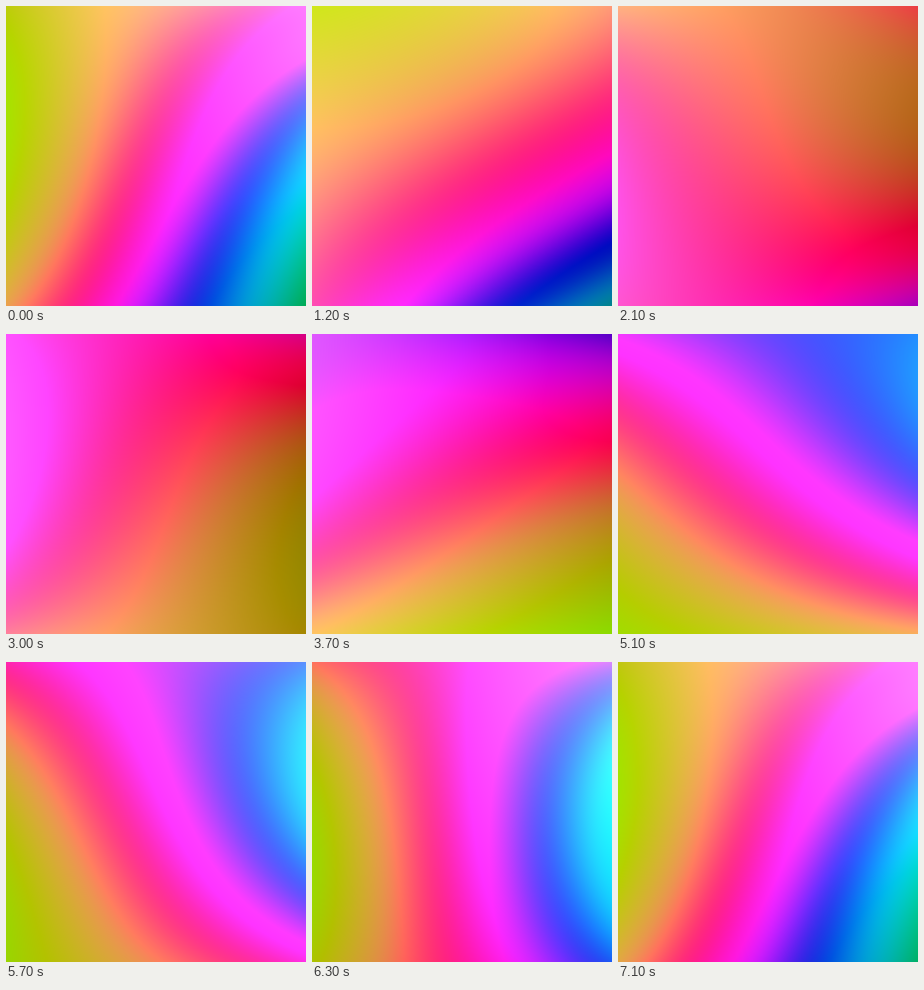
An HTML page with a canvas for the animation above (7.2 s loop, 300 by 300 pixels).

```html
<!DOCTYPE html>
<html lang="en">
<head>
<meta charset="utf-8">
<title>Flowing colour</title>
<style>
html, body { margin: 0; width: 100%; height: 100%; overflow: hidden; }
canvas { display: block; width: 100vw; height: 100vh; }
</style>
</head>
<body>
<canvas id="stage" width="300" height="300"></canvas>
<script>
const SIZE = 300, LOOP = 7200, STEP = 100;
const ctx = document.getElementById('stage').getContext('2d');
const image = ctx.createImageData(SIZE, SIZE);

// Lime, tan, pink, magenta, blue, cyan, green; values past 0..255 clip into flat bands.
const stops = [
  [175, 212, -10], [232, 155, 75], [300, 45, 140], [245, 45, 265],
  [60, 75, 255], [10, 205, 245], [0, 225, 120]
];
const SPACING = 2, FINE = 100, LOW = -2, HIGH = 13;
const ENTRIES = (HIGH - LOW) * FINE;

// Stops continue in a straight line beyond both ends.
function stopAt(i, c) {
  const inner = Math.max(0, Math.min(stops.length - 2, i));
  return stops[inner][c] + (i - inner) * (stops[inner + 1][c] - stops[inner][c]);
}

function catmullRom(a, b, c, d, s) {
  return b + s / 2 * (c - a + s * (2 * a - 5 * b + 4 * c - d + s * (3 * (b - c) + d - a)));
}

const palette = new Float32Array((ENTRIES + 1) * 3);
for (let n = 0; n <= ENTRIES; n++) {
  const place = (LOW + n / FINE) / SPACING, i = Math.floor(place);
  for (let c = 0; c < 3; c++) {
    const near = [-1, 0, 1, 2].map(k => stopAt(i + k, c));
    palette[n * 3 + c] = catmullRom(...near, place - i);
  }
}

function draw(t) {
  // One swing per loop, highest when the loop reaches the given angle.
  const wave = (mean, swing, peak) =>
    mean + swing * Math.cos(2 * Math.PI * (t / LOOP - peak / 360));

  const hue = {
    mid: wave(4.15, 0.7, 310),
    x: wave(1.55, 2.8, 337),
    y: wave(-0.4, 3.5, 43),
    xx: wave(0.15, 0.25, 110),
    xy: wave(0.35, 1.05, 10),
    yy: wave(-0.1, 0.75, 70),
    xyy: wave(-0.2, 2, 125)
  };
  const light = {
    mid: wave(3, 11, 315),
    x: wave(-17, 38, 310),
    y: wave(-11, 24, 190),
    xy: wave(-10, 27, 200)
  };

  const px = image.data;
  let o = 0;
  for (let row = 0; row < SIZE; row++) {
    const y = (row + 0.5) / SIZE * 2 - 1, bendY = y * y - 5 / 9;
    const hueMid = hue.mid + hue.y * y + hue.yy * bendY;
    const hueSlope = hue.x + hue.xy * y + hue.xyy * bendY;
    const lightMid = light.mid + light.y * y;
    const lightSlope = light.x + light.xy * y;
    for (let col = 0; col < SIZE; col++) {
      const x = (col + 0.5) / SIZE * 2 - 1;
      const u = hueMid + hueSlope * x + hue.xx * (x * x - 5 / 9);
      const lift = lightMid + lightSlope * x;
      const n = 3 * Math.max(0, Math.min(ENTRIES, Math.round((u - LOW) * FINE)));
      for (let c = 0; c < 3; c++) px[o++] = palette[n + c] + lift;
      px[o++] = 255;
    }
  }
  ctx.putImageData(image, 0, 0);
}

const start = performance.now();
let shown = -1;
function tick() {
  const t = Math.floor((performance.now() - start) % LOOP / STEP) * STEP;
  if (t !== shown) draw(shown = t);
  requestAnimationFrame(tick);
}
tick();
</script>
</body>
</html>
```
